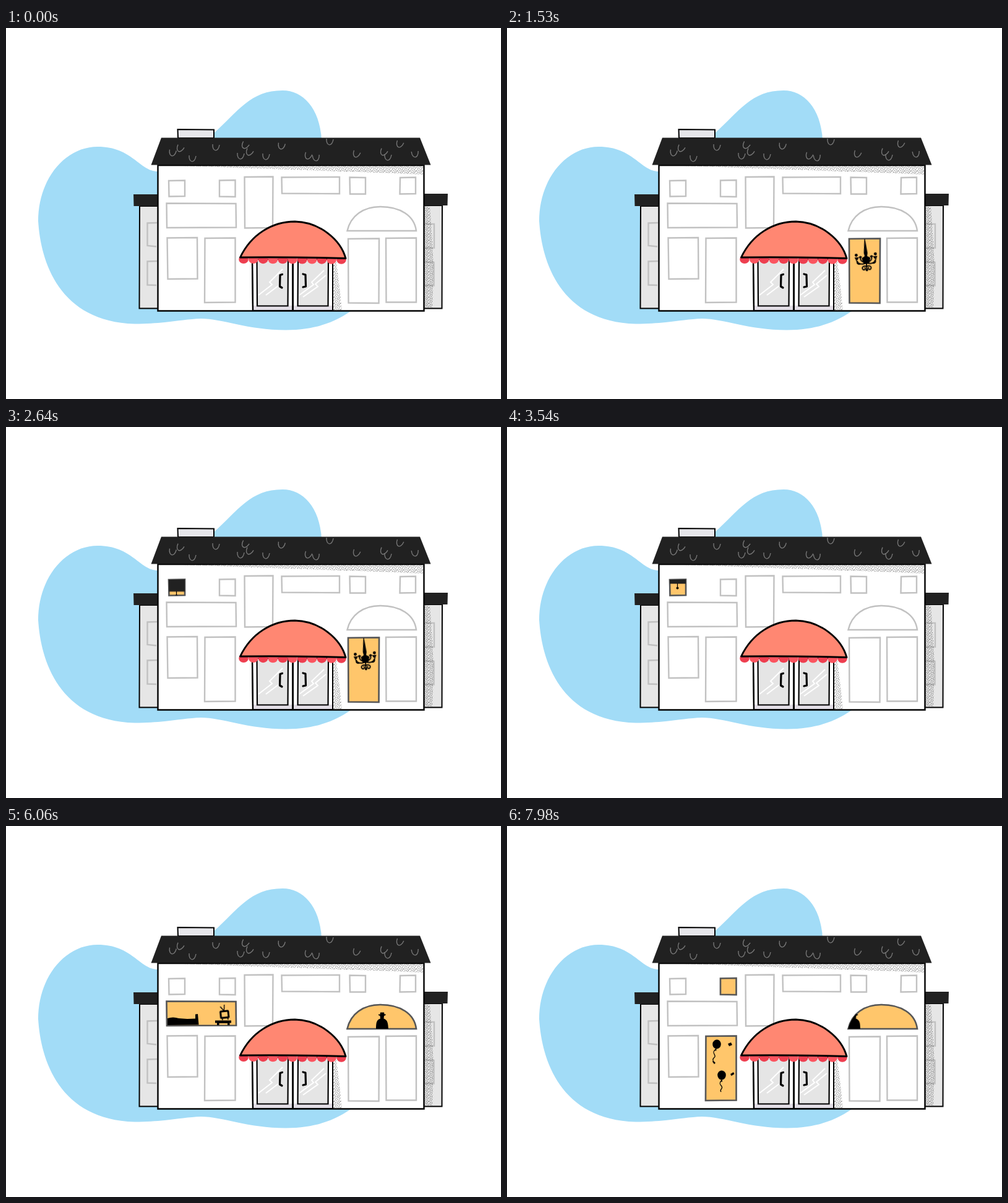
Write an HTML page that moves like this. It is 800 px wide and 600 px high and loops after 8000 ms.

```html
<!DOCTYPE html>
<html lang="en">
<head>
<meta charset="utf-8">
<title>House windows</title>
<style>
html, body { margin: 0; width: 100%; height: 100%; overflow: hidden; background: #fff; }
svg { display: block; width: 800px; height: 600px; }

.grey { fill: none; stroke: #c1c1c1; stroke-width: 2.4; }
.pane { fill: #ffc66b; stroke: #575757; stroke-width: 2.6; }
.line { fill: none; stroke: #000; }

.anim, .lit { animation: 8s -4ms infinite; }
.lit { visibility: hidden; animation-timing-function: step-end; }

#hall { animation-name: hall; }
#shade { animation-name: shade; }
#bedroom { animation-name: bedroom; }
#attic { animation-name: attic; }
#small { animation-name: small; }
#party { animation-name: party; }
@keyframes hall { 0%, 44.25% { visibility: hidden } 7.125% { visibility: visible } }
@keyframes shade { 0%, 62.625% { visibility: hidden } 29.25% { visibility: visible } }
@keyframes bedroom { 0%, 88.875% { visibility: hidden } 55.5% { visibility: visible } }
@keyframes attic { 0% { visibility: hidden } 68.25%, 100% { visibility: visible } }
@keyframes small { 0% { visibility: hidden } 80.25%, 100% { visibility: visible } }
@keyframes party { 0% { visibility: hidden } 92.625%, 100% { visibility: visible } }

#lamp { transform-origin: 578px 341px; animation-name: swing; animation-timing-function: cubic-bezier(.37, 0, .63, 1); }
@keyframes swing {
  0%, 7.125% { transform: rotate(0); animation-timing-function: cubic-bezier(.39, .575, .565, 1) }
  10.875%, 25.875% { transform: rotate(4.4deg) }
  18.375% { transform: rotate(-4.4deg) }
  33.375% { transform: rotate(-4.4deg); animation-timing-function: cubic-bezier(.47, 0, .745, .715) }
  37.125%, 100% { transform: rotate(0) }
}
#blind { animation-name: blind; animation-timing-function: cubic-bezier(.4, 0, .3, 1); }
@keyframes blind {
  0%, 29.25% { transform: translateY(18px) }
  42%, 100% { transform: none }
}
#tv { transform-origin: 353px 305px; animation-name: shake; animation-timing-function: step-end; }
@keyframes shake {
  0%, 66%, 83.25%, 100% { transform: none }
  58.5%, 62.25%, 75.75%, 79.5% { transform: rotate(-6deg) }
  60.375%, 64.125%, 77.625%, 81.375% { transform: rotate(6deg) }
}
#man { animation-name: pace; animation-timing-function: linear; }
@keyframes pace {
  0%, 88.875% { transform: none; animation-timing-function: ease-in-out }
  92.5% { transform: translateX(5px) }
  100% { transform: translateX(-48px) }
}
#balloons { animation-name: rise; animation-timing-function: linear; }
#confetti { animation-name: fall; animation-timing-function: linear; }
@keyframes rise { 0%, 92.625% { transform: translateY(19px) } 100% { transform: translateY(-.6px) } }
@keyframes fall { 0%, 92.625% { transform: translateY(-15px) } 100% { transform: translateY(.5px) } }
</style>
</head>
<body>
<svg viewBox="0 0 800 600">
  <defs>
    <path id="w1" d="M263 247L289 246.500V272L263.500 272.500Z"/>
    <path id="w2" d="M345 246.500L370.500 246V273L345 272.500Z"/>
    <path id="w3" d="M385.500 241L431.500 240.500L431 323L386 323.500Z"/>
    <path id="w4" d="M445.500 241.500L539 241V268L446 267.500Z"/>
    <path id="w5" d="M555.500 241.500L581 242V268.500H556Z"/>
    <path id="w6" d="M637 242L662 241.500V268L636.500 268.500Z"/>
    <path id="w7" d="M259.500 283.500L371.500 284L372 322.500L260 323Z"/>
    <path id="w8" d="M260.500 339.500L309 339L309.500 405.500L261.500 406Z"/>
    <path id="w9" d="M321.500 340L370.500 339.500V443.500L321 444Z"/>
    <path id="w10" d="M553 341L603 340.500L602.500 445L553.500 444.500Z"/>
    <path id="w11" d="M614 340L663 339.500V443.500H614.500Z"/>
    <path id="arch" d="M551.500 328C557 304 577 289 605 289C638 289 660 304 663 328Z"/>
    <path id="scale" d="M-5-5C-6 7 4 9 6-4"/>
    <path id="arm" d="M578 380C569 384 561 379 562.500 371M578 377C570 380 568 374 569 369M578 386C574 383 569 387 571.500 390C574 392.500 577 389.500 575 387.500M568 381C564 382 562 379 564 377"/>
    <g id="balloon">
      <ellipse rx="6.800" ry="7.500"/>
      <path d="M0 6L-3.500 10.500H.5Z"/>
      <path class="line" stroke-width="1.300" d="M-2 10C-8 15 3 18-2 22C-5 25-3 26-3 27"/>
    </g>
    <pattern id="dots" width="12" height="12" patternUnits="userSpaceOnUse" patternTransform="scale(.85)">
      <path stroke="#2a2a2a" stroke-width="1.500" stroke-linecap="round" d="M1 1h0M4 2h0M7.500 1h0M10.500 2.500h0M2.500 4.500h0M6 4.200h0M9 5.500h0M1 7.500h0M4.500 7.200h0M7.500 8h0M11 8.200h0M3 10.300h0M6 10.800h0M9.300 10.700h0"/>
    </pattern>
    <clipPath id="in1"><use href="#w1"/></clipPath>
    <clipPath id="in9"><use href="#w9"/></clipPath>
    <clipPath id="inArch"><use href="#arch"/></clipPath>
  </defs>

  <path fill="#a2dcf7" d="M246 232C215 232 205 192 148 192C95 192 52 245 52 312C56 378 86 475 208 478.500C260 478 285 471 315 470C350 470 390 488.500 452 488.500C510 488 540 470 560 456V300L510 180C507 130 480 101 447 101C395 101 375 135 336 170L300 190Z"/>

  <!-- side wings -->
  <g stroke="#000" stroke-width="2" fill="#e6e6e6">
    <path d="M216 288H246V453.500H215.500Z"/>
    <path d="M675 287H705L704.500 453.500H675Z"/>
    <path fill="#e6e6ea" d="M277.500 164L336 164.500V178H278Z"/>
  </g>
  <g class="grey">
    <path d="M244 315L228.500 315.500V352L243 353.500M244 377L228.500 377.500V415.500L243 416M677 317H692V355.500L677 356M677 378.500L691.500 379V416.500H677"/>
  </g>
  <path fill="url(#dots)" d="M676 288H685L688 330L691 385L689 452H676Z"/>
  <path fill="#212121" d="M206 269H246V288H206.500ZM675 268H714L713.500 287H675Z"/>

  <!-- main house -->
  <path fill="#fff" stroke="#000" stroke-width="2.400" d="M245.500 222H675.500V457.500H245.500Z"/>
  <path fill="url(#dots)" d="M285 223H674V237L600 234L470 229.500Z"/>
  <path fill="#212121" d="M251 177.500H669L686.500 221.500H234.500Z"/>
  <g id="scales" fill="none" stroke="#777" stroke-width="1.400"></g>
  <g class="grey">
    <use href="#w1"/><use href="#w2"/><use href="#w3"/><use href="#w4"/><use href="#w5"/><use href="#w6"/>
    <use href="#w7"/><use href="#w8"/><use href="#w9"/><use href="#w10"/><use href="#w11"/><use href="#arch"/>
  </g>

  <!-- entrance -->
  <path fill="url(#dots)" d="M529 378H534L539 420L543 456H529Z"/>
  <path fill="#e3dee6" stroke="#000" stroke-width="2" d="M398 372H528V457H399Z"/>
  <path fill="#fff" d="M399.500 372H462V449H400ZM465 372H527V449H465Z"/>
  <g fill="#e5e5e5" stroke="#000" stroke-width="2.200">
    <path d="M405.500 374H456L455.500 449.500H406Z"/>
    <path d="M472 374H521L520.500 449.500H471.500Z"/>
  </g>
  <g fill="none" stroke="#fff" stroke-width="2">
    <path d="M408 432L430 415L426 411L447 390M420 432L440 417"/>
    <path d="M474 432L497 415L494 411L514 392M480 435L504 418L500 414L517 400"/>
  </g>
  <path class="line" stroke-width="3" d="M463.500 374V457"/>
  <path class="line" stroke-width="3.200" stroke-linecap="round" stroke-linejoin="round" d="M446.500 398.500L443 399.500L442.500 418L446 420M480 398L484 399L484.500 418L480 419"/>
  <path class="line" stroke-width="2.400" d="M398 376L399 457"/>
  <g id="frill"></g>
  <path fill="#ff8772" stroke="#000" stroke-width="2.900" stroke-linejoin="round" d="M378.500 371C396 334 430 313 467 313C508 314 541 343 549 372.500Q460 370 378.500 371Z"/>

  <!-- lit windows -->
  <g id="hall" class="lit">
    <use class="pane" href="#w10"/>
    <g id="lamp" class="anim">
      <path d="M577.500 341H578.500L581 364L580 369L585 372L583 380L578 382L573 380L571 372L576 369L575 364Z"/>
      <g class="line" stroke-width="1.800" stroke-linecap="round">
        <use href="#arm"/>
        <use href="#arm" transform="matrix(-1 0 0 1 1156 0)"/>
        <path d="M578 378V391"/>
      </g>
      <path d="M559.500 370h7l-2 4h-3zM589.500 370h7l-2 4h-3zM566 369h6l-2 3h-2zM584 369h6l-2 3h-2z"/>
      <circle cx="562.500" cy="366.500" r="2.400"/><circle cx="593.500" cy="366.500" r="2.400"/>
      <circle cx="578" cy="391.500" r="2"/>
    </g>
  </g>

  <g id="shade" class="lit">
    <use class="pane" href="#w1"/>
    <g clip-path="url(#in1)">
      <g id="blind" class="anim">
        <path fill="#212121" d="M262 226H290V253.500H262Z"/>
        <path class="line" stroke-width="1.200" d="M275.500 253V260"/>
        <circle cx="275.500" cy="260.500" r="2"/>
      </g>
    </g>
  </g>

  <g id="bedroom" class="lit">
    <use class="pane" href="#w7"/>
    <path d="M261 322V311Q270 308 279 311L293 312L306 311.500V304.500L310 304L311.500 321.500ZM338 314.500H364V318.500H361.500V322H358V319H344.500V322H341V318.500H338Z"/>
    <g id="tv" class="anim line">
      <rect x="347" y="299.500" width="12.500" height="10.500" rx="1" stroke-width="3"/>
      <path stroke-width="1.400" d="M353 299L347.500 291.500M353 299L354.500 289"/>
      <path stroke-width="2" d="M348 312.500h2M357 312.500h2"/>
    </g>
  </g>

  <g id="attic" class="lit">
    <use class="pane" href="#arch"/>
    <g clip-path="url(#inArch)">
      <path id="man" class="anim" d="M598 329C598 316 599.500 313.500 605 311.500L604.500 307L602 306V304.500L604.500 304.700L605 301.500H611L611.500 304.500L613.500 304.300V306L611 307L610.500 311.500C616 313.500 617.500 317 618 329Z"/>
    </g>
  </g>

  <use id="small" class="lit pane" href="#w2"/>

  <g id="party" class="lit">
    <use class="pane" href="#w9"/>
    <g clip-path="url(#in9)">
      <g id="balloons" class="anim">
        <use href="#balloon" transform="translate(339 353) rotate(6)"/>
        <use href="#balloon" transform="translate(347 403) rotate(-4)"/>
      </g>
      <path id="confetti" class="anim" d="M357 352l5-2 2 4-5 2zM333 379l4 4-2 2-3-4zM361 401l5-3 1.500 3-5 3z"/>
    </g>
  </g>
</svg>
<script>
const add = (id, markup) => document.getElementById(id).innerHTML += markup;

// roof scales: x, y, tilt
[[269, 202, 5], [281, 195, 20], [301, 211, 0], [339, 193, 0], [386, 190, 25], [379, 207, 0],
 [393, 201, 20], [420, 208, 0], [445, 191, 5], [488, 207, 15], [501, 210, -10], [523, 184, 0],
 [566, 204, 15], [610, 201, 20], [617, 209, 0], [636, 188, 15], [661, 204, -10]]
  .forEach(([x, y, tilt]) => add('scales', `<use href="#scale" transform="translate(${x} ${y}) rotate(${tilt})"/>`));

for (let i = 0; i < 11; i++) {
  add('frill', `<ellipse cx="${384 + i * 15.8}" cy="${374 + i * .08}" rx="7.800" ry="7" fill="${i % 2 ? '#fb5560' : '#ee3f50'}"/>`);
}
</script>
</body>
</html>
```
